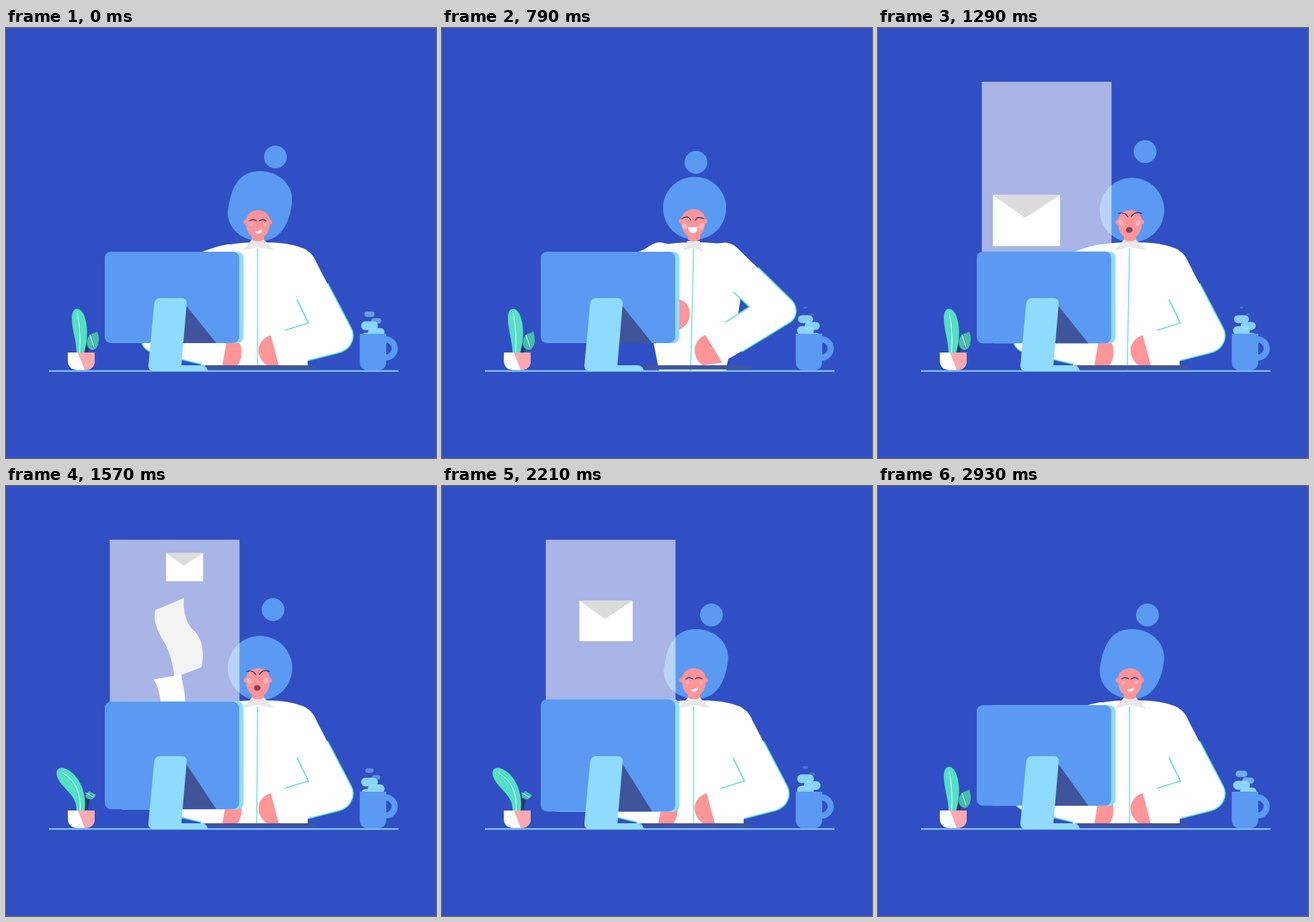
Animation, 640 px wide and 640 px high, one loop 3 s. Source, as an HTML page:

```html
<!DOCTYPE html>
<html lang="en">
<head>
<meta charset="utf-8">
<title>Desk mail</title>
<style>
html, body { margin: 0; width: 100%; height: 100%; overflow: hidden; background: #314fc4; }
svg { display: block; width: 100%; height: 100%; }
.blue { fill: #5a9af2; }
.sky { fill: #8fdbff; }
.skin { fill: #ff9499; }
.blush { fill: #ffb6ba; }
.white { fill: #fff; }
.shade { fill: #3f549b; }
.line { fill: none; stroke: #5fe3cd; stroke-width: 1.8; }
.lash { fill: none; stroke: #35306f; stroke-width: 1.4; stroke-linecap: round; }
.vein { fill: none; stroke: #fff; stroke-width: 1; stroke-linecap: round; }
</style>
</head>
<body>
<svg viewBox="0 0 640 640">
  <defs>
    <clipPath id="beamClip"><rect x="140" y="80" width="220" height="320"/></clipPath>
  </defs>

  <path d="M64 510.5H584" stroke="#8fdbff" stroke-width="2"/>

  <!-- person -->
  <path id="hair" class="blue"/>
  <circle id="bun" class="blue" r="17"/>
  <path id="outline" class="line" stroke-linejoin="round" style="stroke-width:3.4"/>
  <path id="leftLine" class="line" style="stroke-width:3.4"/>
  <path id="torso" class="white"/>
  <path id="leftArm" class="white"/>
  <path id="rightArm" class="white"/>
  <path id="crease" class="line"/>
  <path id="zip" class="line" style="stroke-width:1.4"/>
  <path id="leftHand" class="skin"/>
  <path id="rightHand" class="skin"/>
  <path id="collar" fill="#e8e8e8"/>
  <path class="skin" d="M366 305H384V315Q375 320 366 315Z"/>
  <g id="head">
    <circle class="skin" cx="357" cy="289" r="3.6"/>
    <circle class="skin" cx="392.5" cy="289" r="3.6"/>
    <path class="skin" d="M357 288C357 265.500 393 265.500 393 288C393 300 388 313 375 313.500C362 313 357 300 357 288Z"/>
  </g>
  <g id="calm">
    <path class="lash" d="M363 287Q368 283.500 373 287M377 287Q382 283.500 387 287"/>
    <circle class="blush" cx="365" cy="292.500" r="2.400"/>
    <circle class="blush" cx="385" cy="292.500" r="2.400"/>
    <path class="white" d="M370 303.500Q376 302.500 381 300Q381.500 305 376 306Q372 306 370 303.500Z"/>
  </g>
  <g id="laugh">
    <path class="lash" d="M357 284Q366 277.500 370 286M377 286Q381 279 390 284"/>
    <ellipse class="blush" cx="361" cy="295" rx="3.500" ry="5" transform="rotate(-30 361 295)"/>
    <ellipse class="blush" cx="386" cy="295" rx="3.500" ry="5" transform="rotate(30 386 295)"/>
    <path class="white" d="M366 296Q373 297.500 380 296Q381 305.500 373.500 305.500Q367 305 366 296Z"/>
  </g>
  <g id="shock">
    <path class="lash" d="M358 276Q368 273.500 372 281M377 281Q382 272 392 276"/>
    <ellipse class="blush" cx="362" cy="290" rx="3.300" ry="4.800" transform="rotate(-25 362 290)"/>
    <ellipse class="blush" cx="387" cy="290" rx="3.300" ry="4.800" transform="rotate(25 387 290)"/>
    <ellipse cx="374" cy="300.500" rx="4.900" ry="4.300" fill="#8b464c"/>
  </g>
  <path class="shade" d="M298 502H460Q462 505 458 508.500H298Z"/>

  <!-- mail stream -->
  <rect id="beam" y="80" height="270" fill="#fff"/>
  <g clip-path="url(#beamClip)">
    <path id="sheetA" fill="#f3f3f3"/>
    <path id="sheetB" fill="#fff"/>
    <g id="mailA"><path class="white" d="M-.5-.38H.5V.38H-.5Z"/><path fill="#dcdcdc" d="M-.5-.38H.5L-.02-.04Z"/></g>
    <g id="mailB"><path class="white" d="M-.5-.38H.5V.38H-.5Z"/><path fill="#dcdcdc" d="M-.5-.38H.5L-.02-.04Z"/></g>
  </g>

  <!-- monitor -->
  <rect id="back" class="sky" width="190" rx="9"/>
  <rect id="front" class="blue" width="200" rx="9"/>
  <path id="shadow" class="shade"/>
  <path class="sky" d="M230 402H261Q269 402 269 410L261 502H291Q299 502 300 510.500H221Q211 510.500 212 501L220.500 411Q221 402 230 402Z"/>

  <!-- plant -->
  <path id="stem" fill="#29386f"/>
  <path id="smallLeaf" fill="#45bda9"/>
  <path id="smallVein" class="vein"/>
  <path id="bigLeaf" fill="#53e0c4"/>
  <path id="bigVein" class="vein"/>
  <path class="white" d="M92 483H132V494Q132 509 117 509H107Q92 509 92 494Z"/>
  <path fill="#fba9b1" d="M107 483H132V494Q132 509 117 509Z"/>

  <!-- mug -->
  <g id="steam"></g>
  <path class="blue" d="M526.500 455H566V496Q566 509.500 552 509.500H540Q526.500 509.500 526.500 496Z"/>
  <path d="M565 463.500A13.500 13.500 0 0 1 565 490.500" fill="none" stroke="#5a9af2" stroke-width="9"/>
</svg>
<script>
const $ = id => document.getElementById(id);
const set = (id, attrs) => { for (const k in attrs) $(id).setAttribute(k, attrs[k]); };
const clamp = v => Math.max(0, Math.min(1, v));
const lerp = (a, b, u) => a + (b - a) * u;
const ramp = (t, a, b) => { const u = clamp((t - a) / (b - a)); return u * u * (3 - 2 * u); };

// Blends two paths that share the same commands.
function mix(a, b, u) {
  const goal = b.match(/-?[\d.]+/g);
  let i = 0;
  return a.replace(/-?[\d.]+/g, n => lerp(+n, +goal[i++], u).toFixed(2));
}

// Each part: typing pose, laughing pose.
const body = {
  torso: ['M285 336C315 323 345 319 374 319C405 319 425 320 447 330L449 405L449 424L449 502L449 502L290 502L290 470Z',
          'M285 336C310 326 325 320 374 319C400 319 415 321 425 322L444 405L441 424L424 502L423 510L323 510L315 469Z'],
  leftArm: ['M298 331.500C308 327 318 324 330 322L338 322L330 360L270 450L340 470L328 502L297 501L225 484C214 482 206 477 203 469L200 455L260 380Z',
            'M296 333C308 325 316 318 326 319L338 322L350 360L270 420L352 404L352 449L300 450L240 440C228 437 224 432 222 425L222 415L265 370Z'],
  leftLine: ['M203 469C206 477 214 482 225 484L297 501', 'M222 425C224 432 228 437 240 440L300 450'],
  rightArm: ['M440 327C455 333 459 342 463 351L478 380L513 447C520 460 513 477 497 482L430 499L406 502L394 457L450 439L433 404L400 325Z',
             'M408 322C424 317 432 320 441 329L470 357L520 406C529 416 528 430 518 437L446 481L417 498L392 457L458 415L434 393L400 325Z'],
  outline: ['M478 380L513 447C520 460 513 477 497 482L430 499', 'M470 357L520 406C529 416 528 430 518 437L446 481'],
  crease: ['M433 404L450 439L415 450', 'M434 393L457.500 415L422 438'],
  leftHand: ['M328 468L322 502L345 502C352 491 352 478 348 469Z', 'M345 404L345 449L353 449C375 440 373 408 353 404Z'],
  rightHand: ['M394 457L406 502L388 502C371 490 371 465 394 457Z', 'M392 457L417 498L388 502C371 490 372 465 392 457Z'],
  collar: ['M366 315L384 315L399 331L375 326L352 331Z', 'M365 317L384 317L387 333L374 327L359 331Z'],
};

const hair = {
  calm: 'M378 213C406 213 431 234 425 265C420 296 406 317 378 317C350 317 325 296 331 266C337 232 350 213 378 213Z',
  laugh: 'M376 221.500C402 221.500 423 242 423 268C423 294 402 315 376 315C350 315 329 294 329 268C329 242 350 221.500 376 221.500Z',
  shock: 'M378 223C404.500 223 426 244.500 426 271C426 297.500 404.500 319 378 319C351.500 319 330 297.500 330 271C330 244.500 351.500 223 378 223Z',
};

// Each part: upright, bent by the stream.
const plant = {
  bigLeaf: ['M105 484C105 465 98 450 98 431C98 414 112 414 117 430C123 448 121 466 116 484Z',
            'M105 484C106 462 90 455 80 440C70 425 77 416 89 421C107 428 121 455 117 484Z'],
  bigVein: ['M106 425Q112 455 109.500 484', 'M84 427Q113 443 110.500 484'],
  smallLeaf: ['M136 452C142 470 134 480 128 479C118 477 118 462 126 456Z',
              'M134 460C130 467 125 467 123 466C118 464 116 460 124 454Z'],
  smallVein: ['M125 457L131 475', 'M119 457L130 463'],
  stem: ['M120 470L125 478L120 484L117 484Z', 'M118 464L125 466L122 481L117 484Z'],
};

const pills = [];
for (let i = 0; i < 6; i++) {
  const pill = document.createElementNS('http://www.w3.org/2000/svg', 'rect');
  pill.setAttribute('class', 'sky');
  pills.push($('steam').appendChild(pill));
}

function drawSteam(t) {
  pills.forEach((pill, i) => {
    const right = i % 2, row = i >> 1;
    const y = 426 - 17 * (t / 500 % 1) + 17 * row;
    const w = Math.max(0, Math.min(25, y - 411)), h = w * .53;
    const attrs = { x: (right ? 551 : 541) - w / 2, y: y + 10 * right - h / 2,
      width: w, height: h, rx: h / 2, opacity: .25 + .7 * clamp((w - 8) / 15) };
    for (const k in attrs) pill.setAttribute(k, attrs[k]);
  });
}

const SPEED = .58;
const rise = (t, at, y) => y - (t - at) * SPEED;
const show = (id, on) => { $(id).style.display = on ? '' : 'none'; };

function drawMail(id, y) {
  const w = Math.min(100, 55 + (y - 120) * .3);
  show(id, y < 400 && y > 40);
  set(id, { transform: `translate(${266 - (y - 120) * .27} ${y}) scale(${w})` });
}

function drawSheet(id, y, sway) {
  const wave = 'M-35-41L8-59C6-41 11-23 20-13C35-1 39 20 34 44L-6 59C-10 31-16 14-25 1C-35-18-37-26-35-41Z';
  const flip = 'M-37-52L4-59C6-45 10-30 10-15C12 5 28 20 30 48L-8 59C-10 35-26 20-26-10C-27-25-30-40-37-52Z';
  show(id, y < 400 && y > 15);
  set(id, { d: mix(wave, flip, sway), transform: `translate(257 ${y})` });
}

function draw(t) {
  const laugh = ramp(t, 70, 430) - ramp(t, 857, 1000);
  const shock = ramp(t, 860, 1040) - ramp(t, 1640, 1860);
  for (const id in body) set(id, { d: mix(...body[id], laugh) });
  const lean = ramp(t, 70, 430) - ramp(t, 1071, 1860);
  set('zip', { d: `M374.500 328L${374.5 - 4.5 * lean} ${502 + 8 * lean}` });

  set('hair', { d: mix(mix(hair.calm, hair.laugh, laugh), hair.shock, shock) });
  set('bun', { cx: lerp(lerp(401, 378, laugh), 397.5, shock), cy: lerp(lerp(192, 200, laugh), 184, shock) });
  set('head', { transform: `translate(${-laugh} ${-1.5 * laugh})` });
  show('shock', shock > .5);
  show('laugh', shock <= .5 && laugh > .5);
  show('calm', shock <= .5 && laugh <= .5);

  const bend = ramp(t, 1290, 1480) - ramp(t, 2380, 2570);
  for (const id in plant) set(id, { d: mix(...plant[id], bend) });

  const open = ramp(t, 1000, 1142), close = 1 - ramp(t, 2500, 2740);
  const width = 193 * open * close;
  set('beam', { x: 251 - width / 2, width, opacity: .58 * close });
  drawMail('mailA', rise(t, 1571, 121));
  drawMail('mailB', rise(t, 2214, 201));
  drawSheet('sheetA', rise(t, 1571, 226), clamp((1571 - t) / 200));
  drawSheet('sheetB', rise(t, 1571, 340), clamp(1 - (t - 1571) / 200));

  const shake = t > 928 && t < 1214 ? 7 * Math.sin(Math.PI * (t - 928) / 286) ** 2 : 0;
  const stretch = ramp(t, 1250, 1714) * (1 - clamp((t - 2714) / 286) ** 2);
  const half = 68 + 15.5 * stretch, top = 401 - half;
  set('front', { x: 147 + shake, y: top, height: 2 * half });
  set('back', { x: 163.5 + shake, y: top - .5 * stretch, height: 2 * half + stretch });
  set('shadow', { d: `M268 413L313 ${401 + half}H261Z` });
  drawSteam(t);
}

// The picture advances at 14 steps per second.
const start = performance.now();
function tick(now) {
  const ms = Math.max(0, now - start) % 3000;
  draw(Math.floor((ms + 5) * .014) % 42 / .014);
  requestAnimationFrame(tick);
}
draw(0);
requestAnimationFrame(tick);
</script>
</body>
</html>
```
